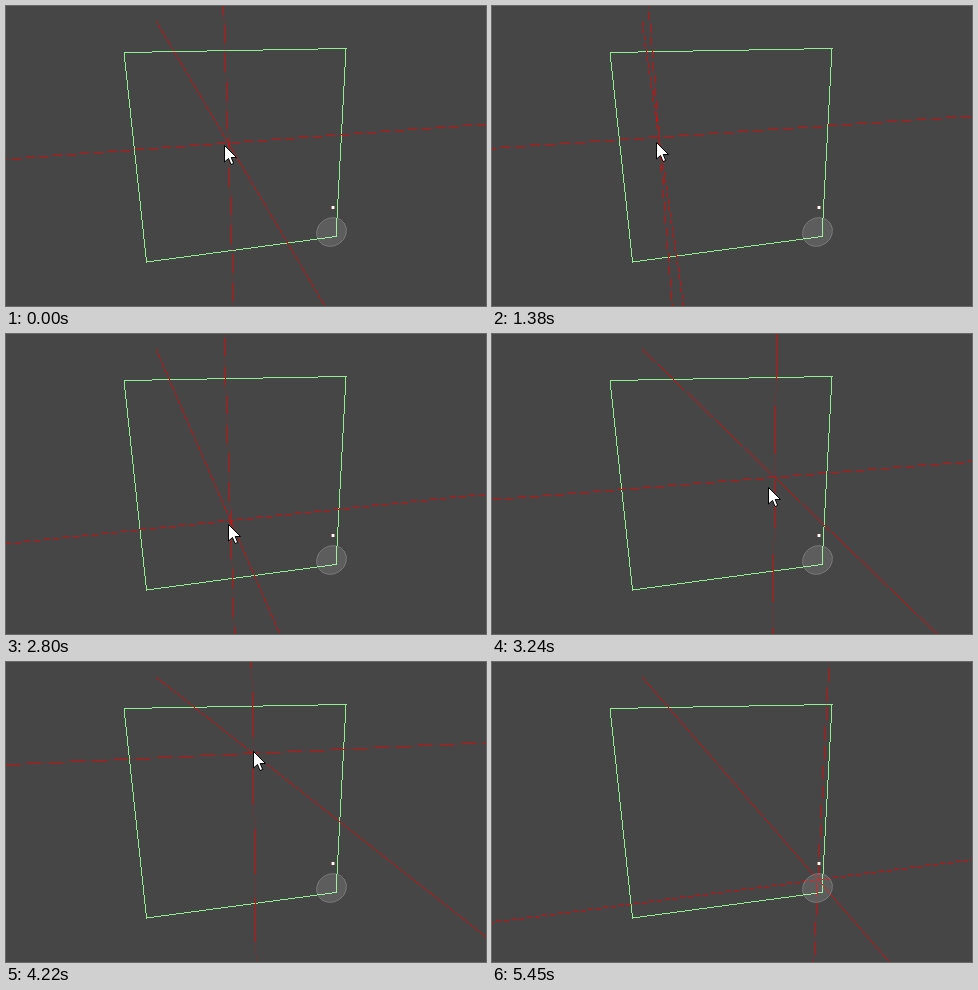
Animation, 480 px wide and 300 px high, one loop 5.82 s. Source, as an HTML page with a canvas:

```html
<!DOCTYPE html>
<html>
<head>
<meta charset="utf-8">
<style>
  html, body { margin: 0; width: 100%; height: 100%; overflow: hidden; background: #464646; }
  canvas { display: block; }
</style>
</head>
<body>
<canvas id="stage" width="480" height="300"></canvas>
<script>
const ctx = document.getElementById('stage').getContext('2d');
const LOOP = 5820, RED = '#cc1010', GREEN = '#90ee90';
const ORIGIN = [150, 15];
const SIDE_VANISH = [1863, 17], DOWN_VANISH = [266, 1390];
const QUAD = [[118, 46.5], [340, 42.5], [330, 230.5], [140.5, 256]];
const ARROW = new Path2D('M0 0V16.5L4 13L6.5 19L9.2 18L6.7 12H12Z');

const REST = { cross: [222.3, 137], tip: [218, 139] };
// Each move: first and last step time, step count, where it ends.
const MOVES = [
  { from: 1030, to: 1470, steps: 6, cross: [156, 130], tip: [153, 135.4] },
  { from: 1840, to: 2360, steps: 7, cross: [163, 205], tip: [167, 196] },
  { from: 2540, to: 3070, steps: 7, cross: [270.6, 172.6], tip: [263, 185.5] },
  { from: 3150, to: 3690, steps: 7, cross: [313.5, 70], tip: [310, 71] },
  { from: 3780, to: 4310, steps: 7, cross: [236, 95], tip: [236, 92] },
  { from: 4390, to: 4920, steps: 7, cross: [204, 211], tip: [204, 208] },
  { from: 5010, to: 5450, steps: 6, cross: [326, 217.8], tip: [322, 219] }
];

const mix = (a, b, p) => a.map((v, i) => v + (b[i] - v) * p);

function poseAt(t) {
  let pose = REST;
  for (const m of MOVES) {
    if (t < m.from) break;
    const stepTime = (m.to - m.from) / (m.steps - 1);
    const step = Math.floor((t - m.from + 8) / stepTime) + 1;
    const p = Math.min(step / m.steps, 1);
    pose = { cross: mix(pose.cross, m.cross, p), tip: mix(pose.tip, m.tip, p) };
  }
  return pose;
}

// Unsmoothed line; thin ones break up wherever they miss pixel centres.
function line(a, b, color, width, min = -Infinity, max = Infinity) {
  const major = Math.abs(b[0] - a[0]) >= Math.abs(b[1] - a[1]) ? 0 : 1;
  const minor = 1 - major;
  const slope = (b[minor] - a[minor]) / (b[major] - a[major]);
  const reach = width * Math.hypot(1, slope) / 2;
  const end = Math.min(max, major ? 300 : 480);
  ctx.fillStyle = color;
  for (let i = Math.max(0, Math.floor(min)); i < end; i++) {
    const v = a[minor] + (i + 0.5 - a[major]) * slope;
    const j = Math.floor(v);
    ctx.globalAlpha = Math.abs(j + 0.5 - v) <= reach ? 1 : 0.2;
    if (major) ctx.fillRect(j, i, 1, 1);
    else ctx.fillRect(i, j, 1, 1);
  }
  ctx.globalAlpha = 1;
}

function edge(a, b) {
  const k = Math.abs(b[0] - a[0]) >= Math.abs(b[1] - a[1]) ? 0 : 1;
  line(a, b, GREEN, 1, Math.min(a[k], b[k]), Math.max(a[k], b[k]));
}

function diagonal(cross) {
  const dx = cross[0] - ORIGIN[0], dy = cross[1] - ORIGIN[1];
  line(ORIGIN, cross, RED, 0.65, Math.abs(dx) >= Math.abs(dy) ? ORIGIN[0] : ORIGIN[1]);
}

function handle() {
  ctx.beginPath();
  ctx.ellipse(325.5, 226, 15.5, 14, -0.6, 0, 7);
  ctx.fillStyle = 'rgba(255,255,255,.12)';
  ctx.fill();
  ctx.lineWidth = 1;
  ctx.strokeStyle = 'rgba(255,255,255,.2)';
  ctx.stroke();
  ctx.fillStyle = 'rgba(255,190,180,.55)';
  ctx.fillRect(325, 200, 4, 3);
  ctx.fillStyle = '#fff';
  ctx.fillRect(326, 200, 2, 3);
}

function pointer([x, y]) {
  ctx.save();
  ctx.translate(Math.round(x) + 0.5, Math.round(y) + 0.5);
  ctx.fillStyle = '#fff';
  ctx.strokeStyle = '#000';
  ctx.lineWidth = 1;
  ctx.fill(ARROW);
  ctx.stroke(ARROW);
  ctx.restore();
}

function draw() {
  const t = performance.now() % LOOP;
  const { cross, tip } = poseAt(t);
  ctx.fillStyle = '#464646';
  ctx.fillRect(0, 0, 480, 300);
  QUAD.forEach((p, i) => edge(p, QUAD[(i + 1) % 4]));
  line(cross, SIDE_VANISH, RED, 0.65);
  line(cross, DOWN_VANISH, RED, 0.65);
  diagonal(cross);
  handle();
  if (t < 5360) pointer(tip);
  requestAnimationFrame(draw);
}
draw();
</script>
</body>
</html>
```
